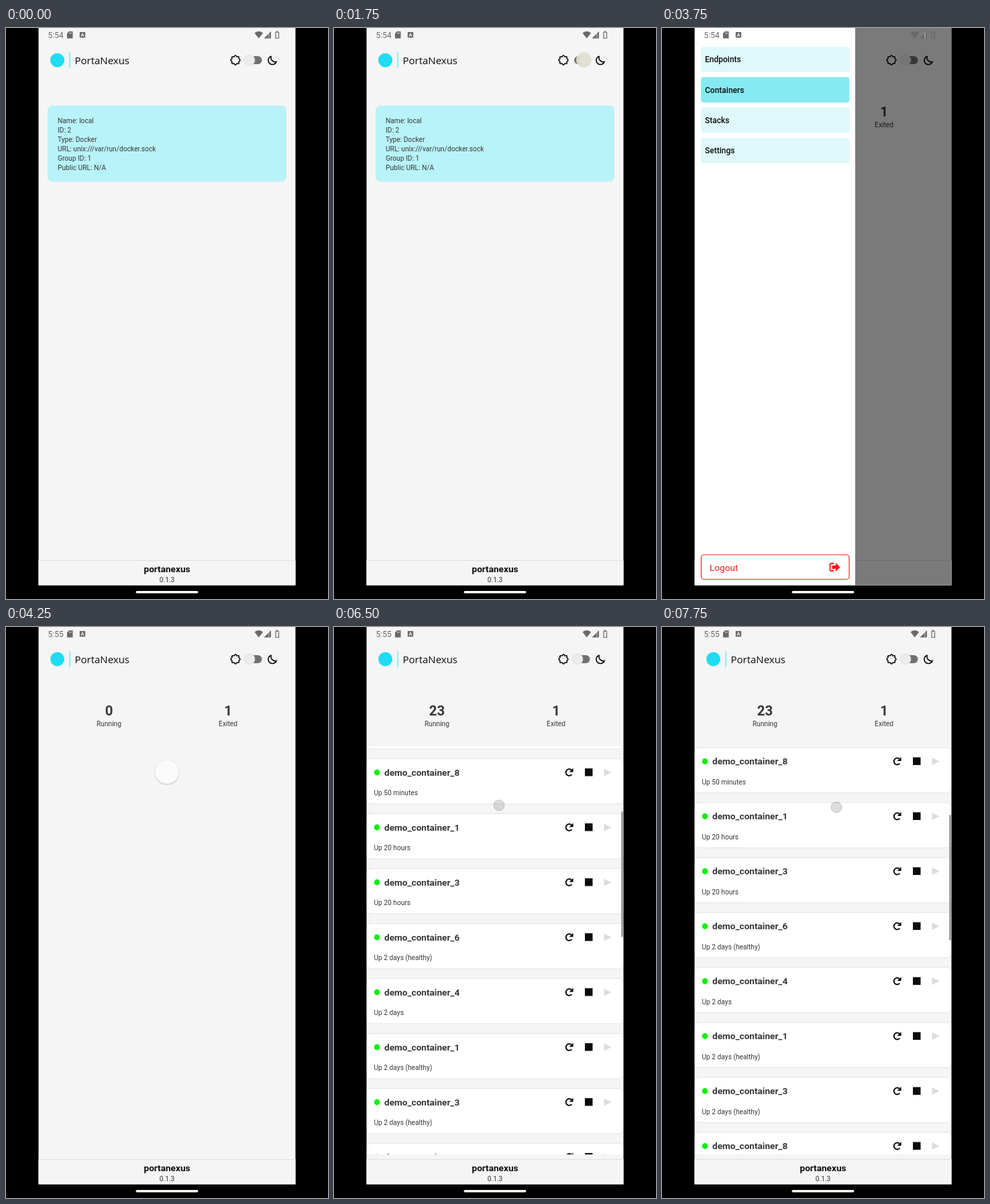
These frames come from a looping animation (480 by 852 pixels, 8000 ms). An HTML page:

```html
<!DOCTYPE html>
<html lang="en">
<head>
<meta charset="utf-8">
<title>PortaNexus</title>
<style>
  html, body { margin: 0; width: 100%; height: 100%; overflow: hidden; background: #000; }
  svg {
    display: block; width: 480px; height: 852px;
    --bg: #f5f5f6; --fg: #0c0c0c; --soft: #363636; --card: #b7f3f8; --edge: #c4eef3;
    --line: #dedee4; --bar: #696969; --track: #717171; --thumb: #ececec;
    font-family: Roboto, sans-serif; font-size: 10.2px;
  }
  svg.dark {
    --bg: #202022; --fg: #fafafa; --soft: #e4e4e4; --card: #17525a; --edge: #22666f;
    --line: #3d3d40; --bar: #d8d8d8; --track: #8a8a8a; --thumb: #20dcf0;
  }
  .bg { fill: var(--bg); }
  .fg { fill: var(--fg); }
  .soft { fill: var(--soft); }
  .bar { fill: var(--bar); }
  .ink { fill: none; stroke: var(--fg); stroke-width: 1.6; }
  .mid { text-anchor: middle; }
  .name { font-weight: 700; font-size: 13.6px; }
  .count { font-weight: 700; font-size: 20.4px; }
  .brand { font: 15px 'Open Sans', sans-serif; }
  .item { font-weight: 500; font-size: 12px; fill: #0c0c0c; }
  .panel { fill: #fff; stroke: #e4e4e8; }
  .dim { fill: #dcdcdc; }
</style>
</head>
<body>
<svg id="stage" viewBox="0 0 480 852">
  <defs>
    <clipPath id="screen"><rect x="48.5" width="383" height="831.5"/></clipPath>
    <clipPath id="list"><rect x="48.5" y="178" width="383" height="609"/></clipPath>
  </defs>
  <rect width="480" height="852"/>
  <g clip-path="url(#screen)">
    <rect class="bg" x="48" width="384" height="832"/>

    <circle cx="76.5" cy="48" r="10.5" fill="#1fdcf2"/>
    <rect x="94.3" y="36" width="1.6" height="24" fill="#7eeaf4"/>
    <text class="brand fg" x="102.5" y="54">PortaNexus</text>
    <path id="sun" class="ink"/>
    <rect x="358" y="42" width="23.5" height="12" rx="6" fill="var(--track)"/>
    <circle id="thumb" cy="48" r="8" fill="var(--thumb)" stroke="#d8d8d8" stroke-width=".6"/>
    <circle id="ripple" cx="372.5" cy="47.5" r="11" fill="#e2dfd2" fill-opacity=".9" stroke="#e6e2c0"/>
    <path class="ink" stroke-linejoin="round" d="M395.4 42.2A6.3 6.3 0 1 0 403.2 50.2A6.2 6.2 0 0 1 395.4 42.2Z"/>

    <g id="endpoints">
      <rect x="62.5" y="116" width="355" height="113" rx="7" fill="var(--card)" stroke="var(--edge)"/>
    </g>

    <g id="containers">
      <text id="running" class="count soft mid" x="153.5" y="131.5">0</text>
      <text class="soft mid" x="153.5" y="148">Running</text>
      <text class="count soft mid" x="331" y="131.5">1</text>
      <text class="soft mid" x="331" y="148">Exited</text>
      <g id="spinner">
        <circle cx="240" cy="217.5" r="18.5" fill="#d6d6d6"/>
        <circle cx="240" cy="216" r="18" fill="#fafafa" stroke="#e6e6e6"/>
        <path id="arc" fill="none" stroke="#363636" stroke-width="2.2" d="M240 208.5A7.5 7.5 0 1 1 232.5 216"/>
      </g>
      <g id="view" clip-path="url(#list)">
        <g id="rows"></g>
        <rect id="scroll" x="428" width="3.5" height="187" fill="#a2a2a2"/>
      </g>
    </g>

    <rect class="bg" x="48" y="794" width="384" height="38"/>
    <rect x="48" y="794" width="384" height="1" fill="var(--line)"/>
    <text class="name fg mid" x="240" y="812">portanexus</text>
    <text class="soft mid" x="240" y="827">0.1.3</text>

    <rect id="scrim" x="48" width="384" height="832"/>
    <g id="drawer">
      <rect x="49" width="239" height="832" fill="#fff"/>
      <g id="menu"></g>
      <rect x="58.5" y="786" width="220.5" height="36.5" rx="4" fill="none" stroke="#f02a20" stroke-width="1.2"/>
      <text x="71" y="809.5" font-size="13.6" fill="#f01a14">Logout</text>
      <path d="M256 799h-3.5q-2 0-2 2v7q0 2 2 2h3.5" fill="none" stroke="#f01a14" stroke-width="1.8"/>
      <path d="M253.5 802h5.5v-4l6.5 6.5-6.5 6.5v-4h-5.5z" fill="#f01a14"/>
    </g>

    <g class="bar">
      <text id="clock" x="62.5" y="14.5" font-size="12">5:54</text>
      <path d="M94 5h5.5v10.5h-8.5v-7.5z"/>
      <path d="M95 6.5v2.5M97 6.5v2.5" stroke="var(--bg)" stroke-width=".8"/>
      <rect x="109.8" y="6" width="8.4" height="8.5" rx="1"/>
      <path d="M112 12.8l2-5 2 5M112.8 11h2.4" fill="none" stroke="var(--bg)"/>
      <path d="M370.5 7.5q6.3-4.8 12.6 0l-6.3 8z"/>
      <path d="M395 5v10.5h-10.5z"/>
      <path d="M392 7v8" stroke="var(--bg)" stroke-width=".7"/>
      <path d="M402 6.5h1.2v-1.5h1.8v1.5h1.5v9h-4.5z" fill="none" stroke="var(--bar)" stroke-width="1.2"/>
    </g>
    <circle id="touch" r="8" fill="#444" fill-opacity=".18" stroke="#555" stroke-opacity=".25"/>
  </g>
  <rect x="193.5" y="840" width="93" height="3.5" rx="1.75" fill="#fafafa"/>
</svg>
<script>
const $ = id => document.getElementById(id);
const LOOP = 8000, STEP = 250, PITCH = 82;
const FULL = 1983, VIEW = 609, BAR = 187;

const info = ['Name: local', 'ID: 2', 'Type: Docker', 'URL: unix:///var/run/docker.sock', 'Group ID: 1', 'Public URL: N/A'];
$('endpoints').innerHTML += info.map((s, i) =>
  `<text class="soft" x="77" y="${142 + i * 14}">${s}</text>`).join('');

// Scalloped sun outline
$('sun').setAttribute('d', Array.from({ length: 73 }, (_, i) => {
  const a = i * Math.PI / 36, r = 6.3 + .75 * Math.cos(8 * a);
  return `${i ? 'L' : 'M'}${(342 + r * Math.cos(a)).toFixed(2)} ${(48 + r * Math.sin(a)).toFixed(2)}`;
}).join(''));

const ids = [6, 0, 2, 3, 8, 1, 3, 6, 4, 1, 3, 8];
function status(i) {
  if (i === 0) return 'Up 3 minutes';
  if (i === 1) return 'Exited (137) 36 seconds ago';
  if (i < 5) return 'Up 50 minutes';
  if (i < 7) return 'Up 20 hours';
  return i === 8 ? 'Up 2 days' : 'Up 2 days (healthy)';
}
$('rows').innerHTML = ids.map((id, i) => {
  const up = i !== 1;
  return `<g transform="translate(0 ${185 + i * PITCH})">
    <rect class="panel" x="49" y=".5" width="382" height="67.5" rx="6"/>
    <circle cx="64" cy="21" r="4.4" fill="${up ? '#12ee10' : '#f01010'}"/>
    <text class="name soft" x="75" y="25.5">demo_container_${id}</text>
    <text class="soft" x="59.5" y="55">${status(i)}</text>
    <path class="ink" style="stroke-width:2" d="M354.2 17.6A4.9 4.9 0 1 0 354.5 24"/>
    <path class="fg" d="M356.6 14.5v6h-6z"/>
    <rect class="${up ? 'fg' : 'dim'}" x="374" y="15" width="11.5" height="11.5"/>
    <path class="${up ? 'dim' : 'fg'}" d="M402.5 15.5l11 5.5-11 5.5z"/>
  </g>`;
}).join('');

$('menu').innerHTML = ['Endpoints', 'Containers', 'Stacks', 'Settings'].map((s, i) =>
  `<rect x="58" y="${28 + i * 45.3}" width="221.5" height="38" rx="4"/>
   <text class="item" x="64" y="${51.3 + i * 45.3}">${s}</text>`).join('');
const items = [...$('menu').querySelectorAll('rect')];

// Linear interpolation over [time, value] keys
function key(t, keys) {
  const n = keys.findIndex(k => k[0] > t);
  if (n === 0) return keys[0][1];
  if (n < 0) return keys[keys.length - 1][1];
  const [a, b] = [keys[n - 1], keys[n]];
  return a[1] + (b[1] - a[1]) * (t - a[0]) / (b[0] - a[0]);
}

const within = (t, a, b) => t >= a && t < b;
const show = (id, on) => $(id).setAttribute('visibility', on ? 'inherit' : 'hidden');
const move = (id, x, y) => $(id).setAttribute('transform', `translate(${x} ${y})`);

function finger(t) {
  if (within(t, 500, 1000)) return [364, 47];
  if (within(t, 1500, 1750)) return [372, 47];
  if (within(t, 2250, 2750)) return [key(t, [[2250, 60], [2500, 190]]), 420];
  if (within(t, 3500, 3750)) return [150, 93];
  if (t >= 5500) return [
    key(t, [[5500, 236], [6500, 246], [7750, 260]]),
    key(t, [[5500, 583], [6500, 266], [7000, 602], [7750, 269]])
  ];
}

function draw(t) {
  $('stage').classList.toggle('dark', within(t, 750, 1750));
  $('thumb').setAttribute('cx', within(t, 1000, 2000) ? 373 : 363);
  show('ripple', within(t, 1750, 2000));

  const second = t >= 3750, loaded = t >= 5250;
  show('endpoints', !second);
  show('containers', second);
  $('clock').textContent = t >= 4250 ? '5:55' : '5:54';
  $('running').textContent = loaded ? 23 : 0;

  show('spinner', within(t, 4250, 4750));
  show('arc', within(t, 4500, 4750));

  show('view', loaded);
  const top = key(t, [[5500, 0], [6500, 317], [7000, 0], [7750, 333.5]]);
  move('rows', 0, -top);
  $('scroll').setAttribute('y', 178 + top * (VIEW - BAR) / (FULL - VIEW));

  const open = within(t, 2250, 4250);
  const x = key(t, [[2250, -200], [2500, -110], [2750, -45], [3000, -12], [3250, 0], [3750, 0], [4000, -120], [4250, -240]]);
  show('drawer', open);
  show('scrim', open);
  move('drawer', x, 0);
  $('scrim').setAttribute('opacity', (x + 240) / 240 * .5);
  items.forEach((r, i) => r.setAttribute('fill', i === +second ? '#86eaf2' : '#def8fb'));

  const p = finger(t);
  show('touch', p);
  if (p) move('touch', ...p);
}

const start = performance.now();
function tick(now) {
  const t = Math.max(0, now - start) % LOOP;
  draw(Math.floor(t / STEP) * STEP);
  requestAnimationFrame(tick);
}
draw(0);
requestAnimationFrame(tick);
</script>
</body>
</html>
```
